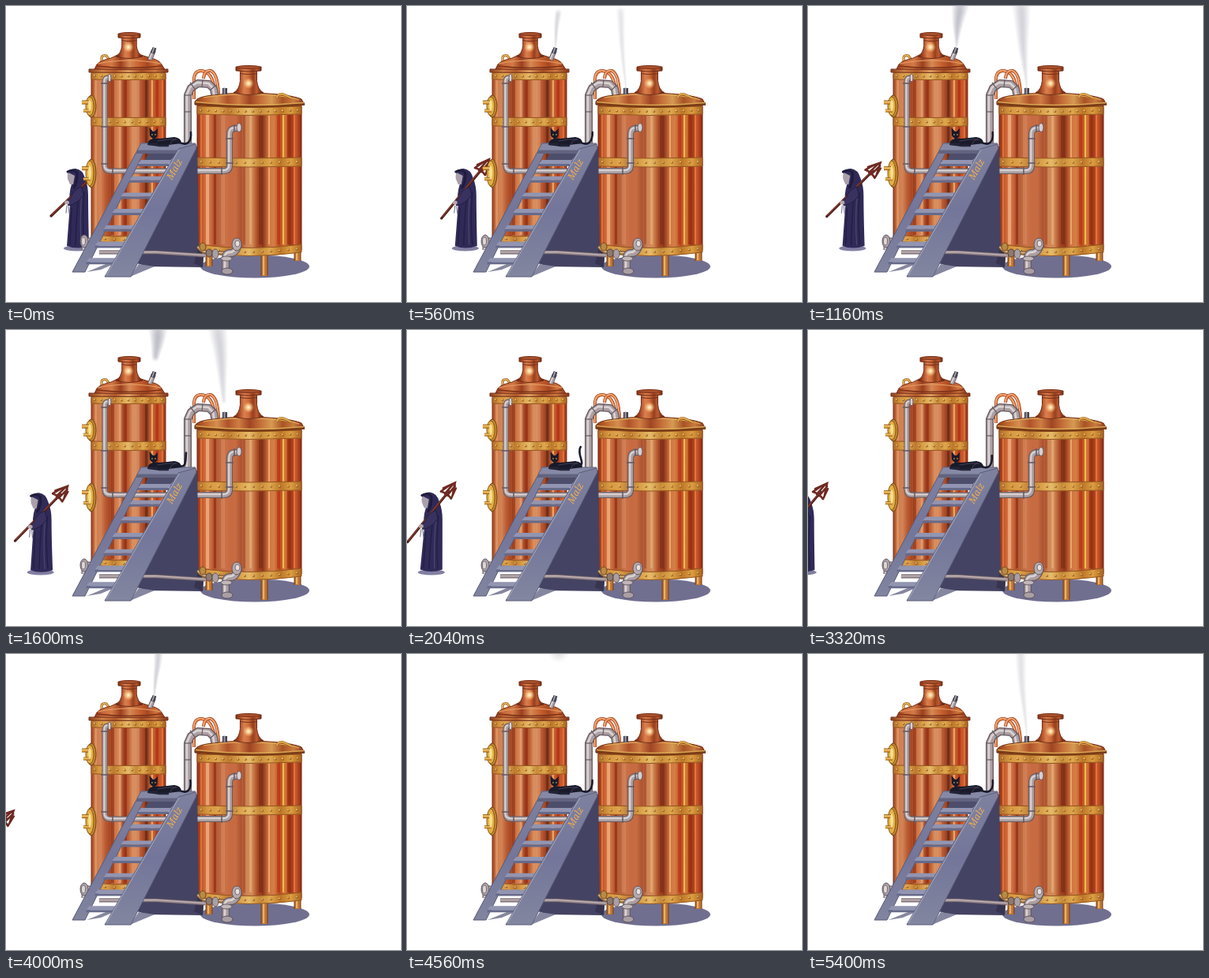
These frames come from a looping animation (500x375 px, 5.44 s). An HTML page with a canvas:

```html
<!DOCTYPE html>
<html lang="en">
<head>
<meta charset="utf-8">
<title>Copper brewhouse</title>
<style>
html, body { margin: 0; width: 100%; height: 100%; overflow: hidden; background: #fff; }
canvas { display: block; }
</style>
</head>
<body>
<canvas id="stage" width="500" height="375"></canvas>
<script>
const LOOP = 5440, STEP = 40;
const stage = document.getElementById('stage').getContext('2d');
const scene = document.createElement('canvas');
scene.width = 500;
scene.height = 375;
let c = scene.getContext('2d');

const mix = (a, b, k) => a + (b - a) * k;
const smooth = (a, b, t) => {
  const k = Math.min(1, Math.max(0, (t - a) / (b - a)));
  return k * k * (3 - 2 * k);
};

function shape(d, fill, stroke, w = 1) {
  const p = new Path2D(d);
  if (fill) { c.fillStyle = fill; c.fill(p); }
  if (stroke) { c.strokeStyle = stroke; c.lineWidth = w; c.stroke(p); }
}

function oval(x, y, rx, ry, fill, stroke) {
  c.beginPath();
  c.ellipse(x, y, rx, ry, 0, 0, 7);
  c.fillStyle = fill;
  c.fill();
  if (stroke) { c.strokeStyle = stroke; c.lineWidth = 1; c.stroke(); }
}

// Colours spread evenly between two x positions
function across(x0, x1, colors) {
  const g = c.createLinearGradient(x0, 0, x1, 0);
  colors.split(' ').forEach((col, i, all) => g.addColorStop(i / (all.length - 1), col));
  return g;
}

function tube(d, w, tones) {
  const [dark, mid, light] = tones;
  c.lineCap = 'butt';
  c.lineJoin = 'round';
  shape(d, null, dark, w);
  shape(d, null, mid, w * 0.74);
  c.save();
  c.translate(-w * 0.1, -w * 0.1);
  shape(d, null, light, w * 0.25);
  c.restore();
}
const STEEL = ['#67595f', '#aaa0a3', '#dcd4d4'];
const COPPER = ['#8d3719', '#d97842', '#ffc59a'];
const GOLD = ['#845112', '#d0913a', '#f2cf77'];

function curved(x0, x1, top, bottom, sagTop, sagBottom) {
  const m = (x0 + x1) / 2;
  return `M${x0} ${top}Q${m} ${top + sagTop * 2} ${x1} ${top}V${bottom}Q${m} ${bottom + sagBottom * 2} ${x0} ${bottom}Z`;
}

function band(x0, x1, y, h, sag, rivets) {
  const fill = across(x0, x1, '#b06a28 #d7983f #deA24c #bd7a30 #d99f48 #e6bb68 #c78a38 #dfa74c #bd7728 #dd9d40 #a8641f');
  shape(curved(x0, x1, y, y + h, sag, sag), fill, '#955522');
  for (let i = 0; i < rivets; i++) {
    const k = (i + 0.5) / rivets;
    const ry = y + h / 2 + sag * 4 * k * (1 - k);
    oval(mix(x0, x1, k), ry, 1.5, 1.5, '#9a5d20');
    oval(mix(x0, x1, k) - 0.5, ry - 0.5, 0.8, 0.8, '#ffe69a');
  }
}

function streaks(y0, y1, spots) {
  for (const [x, w, col] of spots) {
    c.fillStyle = col;
    c.fillRect(x, y0, w, y1 - y0);
  }
}

function glow(x, y, r) {
  const g = c.createRadialGradient(x, y, 0, x, y, r);
  g.addColorStop(0, '#fffbe0');
  g.addColorStop(0.35, 'rgba(255,222,160,.85)');
  g.addColorStop(1, 'rgba(255,190,120,0)');
  oval(x, y, r, r, g);
}

function chimney(x, y, w, h) {
  const fill = across(x - w, x + w, '#7c2d16 #b3532c #d98050 #d06c3a #96401f #bd5b30 #702812');
  const n = w * 0.66;
  shape(`M${x - n} ${y + 5}L${x - n} ${y + h * 0.55}Q${x - n - 1} ${y + h - 4} ${x - w - 3} ${y + h}
    Q${x} ${y + h + 5} ${x + w + 3} ${y + h}Q${x + n + 1} ${y + h - 4} ${x + n} ${y + h * 0.55}V${y + 5}Z`, fill, '#6f2d18');
  shape(curved(x - w, x + w, y + 1, y + 6, 1, 1), fill, '#6f2d18');
  oval(x, y + 1.5, w - 1, 2, '#a9512c', '#7c341c');
  shape(curved(x - n, x + n, y + 9, y + 10, 1, 1), '#74301b');
}

function knob(x, y, r) {
  oval(x + 4, y, 6, r, '#c08530', '#704310');
  oval(x + 2, y, 5, r - 2, '#e2b148', '#8a5616');
  tube(`M${x - 8} ${y - r * 0.35}H${x + 3}`, 5, GOLD);
  tube(`M${x - 6} ${y + r * 0.4}H${x + 3}`, 4, GOLD);
  oval(x + 2, y - 1, 2, r * 0.5, '#f8df8c');
}

function backPipes() {
  tube('M238 118V94Q238 82 247 82Q258 83 262 96L266 112', 4, COPPER);
  tube('M250 92Q251 81 259 82Q268 85 269 112', 4, COPPER);
  tube('M230 180V113L234 104L243 98L257 99L263 105L265 117', 10, STEEL);
  for (const d of ['M225 113H235', 'M225 134H235', 'M233 97L239 105', 'M249 93L248 103', 'M258 107L266 100'])
    shape(d, null, '#6d6167', 1.3);
}

function tallTank() {
  shape(curved(108, 202, 86, 296, 1, 4), across(108, 202,
    '#a0481f #cf7d4c #d28456 #bb5c34 #a84722 #cc7042 #d88b5c #9f3f1e #bd5f34 #db9362 #c67146 #b04f2c #87361b #d07340 #b84520 #cc5c2c #92371a'), '#7a2f18');
  streaks(94, 290, [
    [112, 3, 'rgba(255,195,150,.3)'], [133, 4, 'rgba(132,40,18,.5)'], [143, 3, 'rgba(255,204,166,.3)'],
    [150, 3, 'rgba(138,38,16,.55)'], [163, 6, 'rgba(236,170,126,.35)'], [176, 3, 'rgba(98,38,20,.55)'],
    [184, 2, 'rgba(255,206,120,.6)'], [190, 3, 'rgba(176,44,14,.6)'], [197, 2, 'rgba(255,146,76,.5)']]);
  band(108, 202, 141, 11, 0.5, 10);
  band(108, 202, 290, 8, 2, 8);
  tube('M121 70V65Q122 62 127 63L130 67', 3, GOLD);
  shape('M111 82L115 74Q119 69 133 66L141 62H171L180 65Q194 68 197 74L202 82Z',
    across(111, 202, '#8a3518 #c9683a #d27a46 #9b3f1d #d68854 #c86332 #a84822 #d0733a #8a3215'), '#6f2c15');
  shape('M116 73Q156 65 196 73', null, '#e9a068', 1.2);
  shape('M115 76Q155 81 197 76', null, '#7d331a', 1.4);
  band(108, 202, 84, 9, 0.5, 11);
  shape(curved(105, 205, 80, 84, 0.5, 0.5), across(105, 205, '#8e421f #d08348 #b2592c #df9a5c #a54d25 #cf7a42 #85371a'), '#72301a');
  chimney(156, 34, 14, 30);
  glow(155, 52, 7);
  tube('M182 68L187 56', 6, STEEL);
  tube('M185.5 60L188 53', 5, ['#292936', '#50505e', '#b4b4c0']);
  knob(104, 127, 14);
  knob(104, 212, 18);
  tube('M132 91H129Q125 91 125 96V202Q125 209 132 209H290', 7, STEEL);
  for (const d of ['M120 98H130', 'M120 153H130', 'M120 200H130', 'M135 204V214'])
    shape(d, null, '#685b62', 1.6);
  oval(131, 91, 2, 5, '#d8d2d2', '#6b5d62');
  tube('M112 297H103Q99 297 99 301V309', 7, STEEL);
  oval(99, 298, 5, 8, '#aaa1a6', '#61555f');
  oval(98, 298, 2.5, 5, '#ddd7d8', '#7c7077');
}

function wideTank() {
  oval(315, 330, 69, 14.5, '#706f90');
  for (const [x, y, h] of [[257, 310, 20], [327, 314, 28], [369, 308, 15]])
    tube(`M${x} ${y}v${h}`, 9, ['#7d431c', '#bd7437', '#e9b263']);
  shape(curved(242, 374, 125, 309, 4, 5), across(242, 374,
    '#8f3216 #c95a2b #d98253 #b9532b #b8643c #cb7249 #c76a42 #c66c42 #ae5230 #cf8656 #d48b58 #aa4a25 #8d371b #cf7340 #d57f45 #bb481f #d67a36 #9a3718 #cb562a #8a2a10'), '#742b14');
  streaks(136, 302, [
    [246, 2, 'rgba(255,150,80,.5)'], [253, 4, 'rgba(255,211,166,.45)'], [263, 3, 'rgba(128,40,20,.6)'],
    [272, 5, 'rgba(238,172,130,.25)'], [300, 3, 'rgba(150,54,24,.4)'], [308, 3, 'rgba(255,220,160,.3)'],
    [320, 5, 'rgba(118,40,20,.55)'], [332, 2, 'rgba(255,201,130,.6)'], [343, 4, 'rgba(176,46,16,.5)'],
    [350, 2, 'rgba(255,220,96,.7)'], [356, 4, 'rgba(152,36,12,.6)'], [364, 2, 'rgba(255,160,80,.5)']]);
  band(242, 374, 192, 11, 1, 12);
  band(242, 374, 302, 10, 4.5, 12);
  shape('M239 125V121Q242 116 254 114Q280 110 308 110Q358 111 374 118L378 125Q308 133 239 125Z',
    across(239, 378, '#8d3c1b #c0662f #d58f50 #b0522a #cf7d43 #a04523 #c56f39 #d69a53 #a85324 #c97c3f #853215'), '#6f2c14');
  band(242, 374, 127, 10, 1.5, 14);
  shape('M239 123Q308 131 378 124', null, '#7a3c16', 3.5);
  shape('M240 121.5Q308 129 377 122.5', null, '#dba552', 1.5);
  shape('M250 116Q280 111 308 112Q350 112 371 119', null, '#e0ae5e', 1.2);
  chimney(307, 76, 16, 34);
  glow(307, 98, 7);
  tube('M343 116Q345 110 351 112Q358 115 362 117', 3, GOLD);
  tube('M277 112V104', 6, ['#292936', '#5c5560', '#a59ca5']);
  tube('M240 209H276Q283 209 283 202V163Q283 155 290 155H296', 8, STEEL);
  oval(295, 154, 3, 5.5, '#d7d0d1', '#6a5d64');
  for (const d of ['M278 168H288', 'M278 199H288', 'M273 204V214', 'M289 150V160'])
    shape(d, null, '#685b62', 1.6);
}

function stairs() {
  shape('M238 178H242L244 303L250 318L249 331L178 330L166 326Z', '#444363');
  shape('M244 303L250 318L249 331L238 326Z', '#37344f');
  tube('M118 312H190L252 316', 5, ['#62545f', '#998a91', '#c7bbbb']);
  shape('M102 337L131 325H141L120 334ZM157 343L168 327L188 330Z', '#85869f');
  const rail = c.createLinearGradient(0, 175, 0, 343);
  rail.addColorStop(0, '#7f819f');
  rail.addColorStop(0.5, '#73769a');
  rail.addColorStop(1, '#82869f');
  shape('M182 184H219L209 195H176Z', '#4d4d6c');
  shape('M171 174H180L100 337H84Z', rail, '#595b77');
  for (let i = 0; i < 7; i++) {
    const y = 195 + i * 20.7, x = 171 - i * 10.9, r = 209 - i * 11.2;
    shape(`M${x} ${y}H${r + 2}L${r - 3} ${y + 5}H${x - 4}Z`, '#9295b1');
    shape(`M${x - 4} ${y + 5}H${r - 3}V${y + 8}H${x - 4}Z`, '#676a8a');
  }
  shape('M171 174H240L235 183H166Z', '#8689a6', '#666982');
  shape('M166 183H223L221 187H165Z', '#62647f');
  shape('M218 181L240 175L241 180L158 343H125Z', rail, '#5b5e79');
  shape('M219 182L127 341', null, '#a0a3b8', 1.2);
  c.save();
  c.translate(210, 221);
  c.rotate(-1.06);
  c.font = 'italic 12px "Noto Serif", "Liberation Serif", serif';
  c.fillStyle = '#f0ae50';
  c.fillText('Malz', 0, 0);
  c.restore();
}

function lowerPipes() {
  tube('M243 305Q249 313 259 312L289 314', 5, ['#6f4c2a', '#ab8152', '#dfc08e']);
  oval(249, 305, 4, 5, '#b98a45', '#744717');
  oval(257, 313, 4, 5, '#8f7a70', '#54423f');
  oval(265, 314, 4, 6, '#aaa0a3', '#61545a');
  tube('M294 302Q291 314 283 313Q277 314 278 322V335', 10, STEEL);
  oval(292, 302, 6, 8, '#b6abac', '#64565d');
  oval(293, 301, 3, 4, '#e6dfde', '#7b6e73');
  oval(279, 320, 7, 3, '#c1b7b8', '#685c62');
  oval(280, 336, 7, 4, '#a99fa5', '#5e535b');
}

function walker(t) {
  const x = 90 - t * 0.029, gait = Math.sin(t / 560 * Math.PI);
  const tilt = 0.065 * (1 - Math.cos((t - 2040) / 700 * Math.PI));
  c.save();
  c.translate(x, 0);
  oval(0, 307, 17, 3.5, '#817fa2');
  c.translate(0, gait * 0.5);
  const hem = gait * 1.2;
  shape(`M-7 226Q-11 238 -9 252L${-13 + hem} 304Q0 309 ${15 + hem} 304Q14 264 14 240Q14 228 10 218
    Q7 207 -2 206Q-8 206 -11 210Q-13 213 -9 216Z`, '#302a58');
  shape('M-11 211Q-13 215 -12 219L-9 226L-5 226L-3 215Z', '#aaa0ab');
  shape('M-12 210Q-5 206 0 211Q1 222 -4 230', null, '#1f1c3c', 3);
  shape(`M3 232Q-1 262 ${-2 + hem} 303M9 236Q6 268 ${9 + hem} 302M-7 256L${-9 + hem} 302`, null, '#211f41', 1.3);
  shape(`M6 238Q3 268 ${5 + hem} 302`, null, '#4b476f', 1.2);

  c.save();
  c.translate(-8, 244);
  c.rotate(tilt);
  c.lineCap = 'round';
  shape('M-22 25L30 -39', null, '#4e211d', 3.2);
  shape('M-21 23L30 -40', null, '#8f3f30', 1.2);
  shape('M20 -39Q28 -37 33 -30M20 -39L30 -46M25 -36L36 -49M33 -30L39 -43M23 -43L38 -50L35 -35M28 -34L38 -46', null, '#6e2a22', 2.6);
  c.restore();

  shape('M5 229Q-5 233 -8 243L-13 247L-11 253Q0 251 8 240Z', '#393260', '#211f40');
  oval(-13, 249, 3, 2.5, '#b8a8aa');
  shape('M-13 253L-14 262M-11 254L-10 263', null, '#85839a', 1.2);
  c.restore();
}

function cat(t) {
  const up = smooth(1350, 1950, t) * (1 - 0.55 * smooth(2150, 2760, t)) * (1 - smooth(2800, 3500, t));
  const sway = Math.sin(t / 340) * 0.8;
  c.lineCap = 'round';
  const tipX = mix(234, 220, up) + sway, tipY = mix(160, 148, up);
  shape(`M218 172C${mix(230, 227, up)} ${mix(179, 170, up)} ${mix(235, 214, up)} ${mix(171, 157, up)} ${tipX} ${tipY}`, null, '#1b1b2c', 2.6);
  shape('M180 172Q184 166 194 168Q205 167 213 166Q222 167 222 174L206 176L194 178L179 176Z', '#191a2a');
  shape('M182 164L181.5 154L186 159H188L192 155L191.5 165Q187 172 182 164Z', '#191a2a');
  shape('M192 171Q205 168 216 169M208 175Q209 170 215 169', null, '#44465c', 0.9);
  shape('M181 175H191M194 177H205', null, '#242538', 2.5);
  oval(185, 163, 0.9, 0.8, '#d4bd4b');
  oval(189, 163, 0.9, 0.8, '#d4bd4b');
}

// A plume is made only from vapour released between start and end
function plume(t, x, y, lean, rise, start, end, power) {
  for (let i = 0; i < 34; i++) {
    const f = i / 33, born = t - f * rise;
    if (born < start || born > end) continue;
    const spread = smooth(start + 200, start + 1100, t);
    const r = 2 + f * mix(4, 12, spread);
    const px = x + lean * f + Math.sin(born / 95) * f * 1.6;
    const py = y * (1 - f) - f * 4;
    const alpha = power * mix(0.23, 0.1, f);
    const g = c.createRadialGradient(px, py, 0, px, py, r);
    g.addColorStop(0, `rgba(142,143,159,${alpha})`);
    g.addColorStop(1, 'rgba(160,161,175,0)');
    oval(px, py, r, Math.max(r, 3), g);
  }
}

backPipes();
tallTank();
wideTank();
stairs();
lowerPipes();
c = stage;

function draw(t) {
  c.fillStyle = '#fff';
  c.fillRect(0, 0, 500, 375);
  walker(t);
  c.drawImage(scene, 0, 0);
  cat(t);
  plume(t, 188, 51, 4, 380, 250, 1500, 1);
  plume(t, 188, 51, 4, 380, 3580, 4210, 1.1);
  plume(t, 277, 103, -9, 440, 150, 1550, 1.1);
  plume(t, 277, 103, -9, 600, 2120, 2640, 0.4);
  plume(t, 277, 103, -9, 400, 4850, LOOP, 1);
}

const begin = performance.now();
function tick() {
  const t = (performance.now() - begin) % LOOP;
  draw(Math.floor(t / STEP) * STEP);
  requestAnimationFrame(tick);
}
tick();
</script>
</body>
</html>
```
